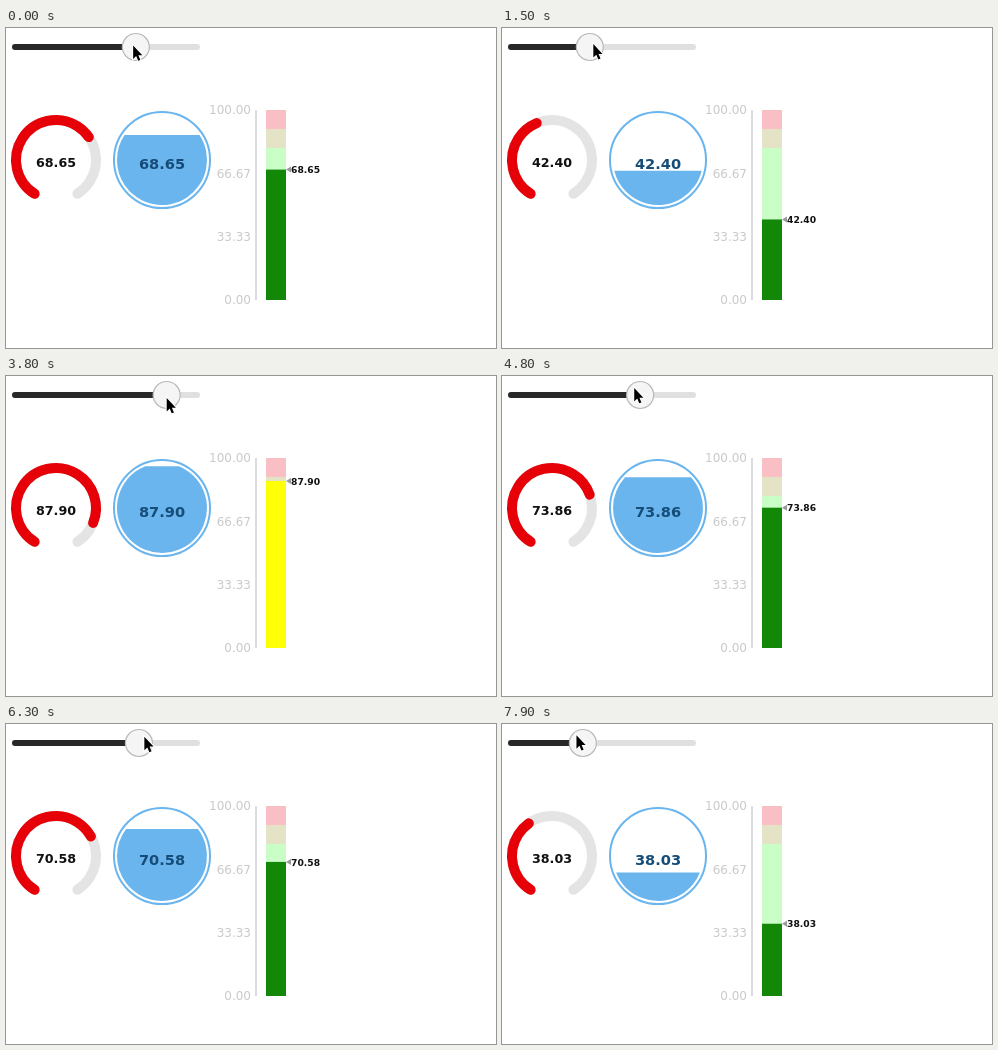
Recreate the animation shown at these times as an HTML page with a canvas. Size 490x320 px, loop 8000 ms.

```html
<!DOCTYPE html>
<html lang="en">
<head>
<meta charset="utf-8">
<title>Slider gauges</title>
<style>
  html, body { margin: 0; width: 100%; height: 100%; overflow: hidden; background: #fff; }
  canvas { display: block; }
</style>
</head>
<body>
<canvas id="stage" width="490" height="320"></canvas>
<script>
const ctx = document.getElementById('stage').getContext('2d');
const LOOP = 8000, STEP = 100;
const RED = '#e60008', BLUE = '#6ab5ee';

// The drag as a few points: time in ms, slider value
const DRAG = [
  [0, 68.65], [1100, 31.6], [1200, 31.6], [1500, 42.4], [2400, 87],
  [2900, 63.47], [3800, 87.9], [4200, 86.6], [4500, 86.6], [5500, 27.6],
  [5600, 27.6], [5700, 32.12], [7000, 100], [7100, 99.8], [7400, 78], [7900, 38.03]
];

const slope = i => (DRAG[i + 1][1] - DRAG[i][1]) / (DRAG[i + 1][0] - DRAG[i][0]);

// Monotone tangent: flat at turning points, harmonic mean elsewhere.
function tangent(i) {
  if (i === 0) return slope(0);
  if (i === DRAG.length - 1) return slope(i - 1);
  const a = slope(i - 1), b = slope(i);
  return a * b > 0 ? 2 * a * b / (a + b) : 0;
}

function valueAt(time) {
  let i = 0;
  while (i < DRAG.length - 2 && DRAG[i + 1][0] <= time) i++;
  const [start, from] = DRAG[i], [end, to] = DRAG[i + 1];
  const span = end - start, u = (time - start) / span, w = 1 - u;
  return from * (1 + 2 * u) * w * w + to * u * u * (3 - 2 * u)
    + span * u * w * (tangent(i) * w - tangent(i + 1) * u);
}

const thumbAt = time => 20 + 1.6 * valueAt(time);

function text(str, x, y, font, color, align) {
  ctx.font = font + ' "DejaVu Sans", sans-serif';
  ctx.fillStyle = color;
  ctx.textAlign = align;
  ctx.fillText(str, x, y);
}

function rect(x, y, w, h, color) {
  ctx.fillStyle = color;
  ctx.fillRect(x, y, w, h);
}

function stroke(color, width) {
  ctx.strokeStyle = color;
  ctx.lineWidth = width;
  ctx.stroke();
}

function track(from, to, color) {
  ctx.beginPath();
  ctx.moveTo(from, 19);
  ctx.lineTo(to, 19);
  stroke(color, 6);
}

function drawSlider(x) {
  track(9, 191, '#e0e0e0');
  track(9, x, '#282828');
  ctx.beginPath();
  ctx.arc(x, 19, 13.5, 0, 2 * Math.PI);
  ctx.fillStyle = '#f5f5f5';
  ctx.fill();
  stroke('#b8b8b8', 1.2);
}

function drawArcGauge(value, label) {
  const half = 147.7 * Math.PI / 180, start = -Math.PI / 2 - half;
  const band = (share, color) => {
    ctx.beginPath();
    ctx.arc(50, 132, 40, start, start + 2 * half * share);
    stroke(color, 10);
  };
  band(1, '#e4e4e4');
  band(value / 100, RED);
  text(label, 50, 139.2, 'bold 12.7px', '#111', 'center');
}

function drawLiquid(value, label) {
  const half = Math.PI * value / 100, down = Math.PI / 2;
  ctx.beginPath();
  ctx.arc(156, 132, 48, 0, 2 * Math.PI);
  stroke(BLUE, 2);
  ctx.beginPath();
  ctx.arc(156, 132, 45, down - half, down + half);
  ctx.fillStyle = BLUE;
  ctx.fill();
  text(label, 156, 141.2, 'bold 14.6px', '#164d78', 'center');
}

function drawBar(value, label) {
  const yOf = v => 272 - 1.9 * v, y = yOf(value);
  for (let tick = 0; tick <= 3; tick++) {
    const mark = tick * 100 / 3;
    text(mark.toFixed(2), 245, yOf(mark) + 4.4, '12px', '#cacaca', 'right');
  }
  rect(249, 82, 2, 190, '#dcdce0');
  rect(260, 82, 20, 19, '#f9bfc4');
  rect(260, 101, 20, 19, '#e4e3c6');
  rect(260, 120, 20, 152, '#c9ffc6');
  rect(260, y, 20, 272 - y, value < 80 ? '#138808' : value < 90 ? '#ffff05' : RED);
  ctx.fillStyle = '#999';
  ctx.fill(new Path2D(`M280 ${y}l5 -3v6z`));
  text(label, 285, y + 3.7, 'bold 9.2px', '#111', 'left');
}

const arrow = new Path2D('M0 0V13.5L3 10.7L5 15.4L7.2 14.5L5.2 9.8H9.2Z');

function drawPointer(x, y) {
  ctx.save();
  ctx.translate(x, y);
  ctx.strokeStyle = '#fff';
  ctx.lineWidth = 2;
  ctx.stroke(arrow);
  ctx.fillStyle = '#000';
  ctx.fill(arrow);
  ctx.restore();
}

function frame() {
  const time = Math.floor(performance.now() % LOOP / STEP) * STEP;
  const value = valueAt(time), label = value.toFixed(2);
  // The pointer leads the thumb and lifts as it speeds up.
  const lead = thumbAt(time + 25) - thumbAt(time - 25);
  rect(0, 0, 490, 320, '#fff');
  drawSlider(thumbAt(time));
  drawArcGauge(value, label);
  drawLiquid(value, label);
  drawBar(value, label);
  drawPointer(thumbAt(time) + lead, 22 - 1.7 * Math.abs(lead));
  requestAnimationFrame(frame);
}

ctx.lineCap = 'round';
frame();
</script>
</body>
</html>
```
